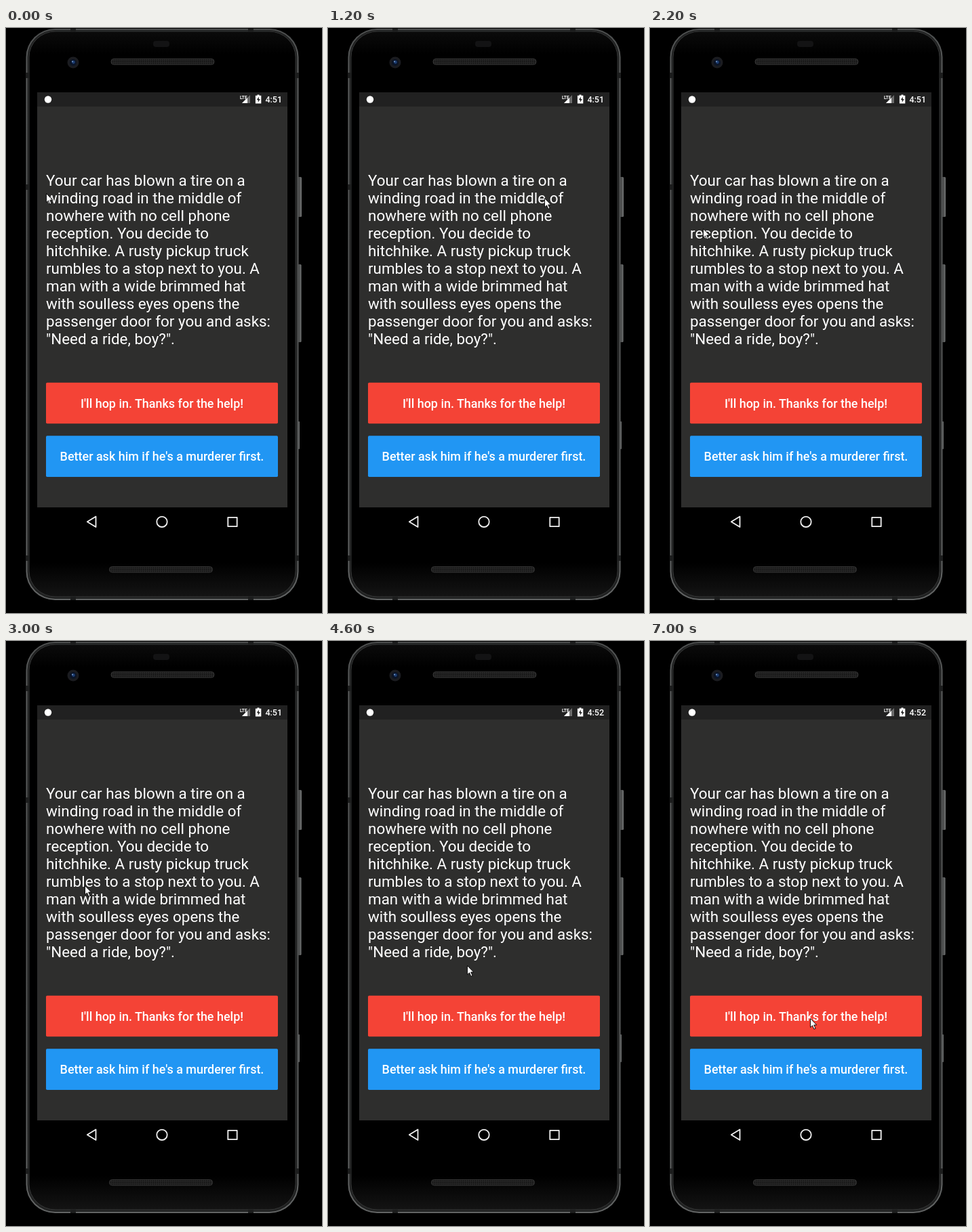
An HTML page for the animation above (8000 ms loop, 466 by 864 pixels).

```html
<!DOCTYPE html>
<html lang="en">
<head>
<meta charset="utf-8">
<title>Story choice</title>
<style>
  html, body { margin: 0; width: 100%; height: 100%; overflow: hidden; background: #000; }
  svg { display: block; width: 466px; height: 864px; }
  text { font-family: Roboto, sans-serif; fill: #fff; }
  .story { font-size: 22.43px; }
  .choice { font-size: 17.95px; font-weight: 500; text-anchor: middle; }
  .clock { font-size: 12.56px; font-weight: 500; }
  .nav { fill: none; stroke: #f2f2f2; stroke-width: 1.8; stroke-linejoin: round; }
</style>
</head>
<body>
<svg viewBox="0 0 466 864">
  <defs>
    <linearGradient id="rim" x2="0" y2="1">
      <stop offset="0" stop-color="#4c4e4e"/>
      <stop offset=".08" stop-color="#5c5e5e"/>
      <stop offset=".5" stop-color="#525454"/>
      <stop offset="1" stop-color="#626464"/>
    </linearGradient>
    <linearGradient id="key">
      <stop offset="0" stop-color="#2b2c2c"/>
      <stop offset="1" stop-color="#757777"/>
    </linearGradient>
    <linearGradient id="glass" x2="0" y2="1">
      <stop offset="0" stop-color="#0b0b0b"/>
      <stop offset=".04" stop-color="#000"/>
      <stop offset=".94" stop-color="#000"/>
      <stop offset="1" stop-color="#141414"/>
    </linearGradient>
    <pattern id="mesh" width="3" height="3" patternUnits="userSpaceOnUse">
      <rect width="3" height="3" fill="#262626"/>
      <circle cx="1.5" cy="1.5" r=".9" fill="#101010"/>
    </pattern>
  </defs>
  <rect width="466" height="864"/>

  <!-- Phone body -->
  <g fill="url(#key)">
    <rect x="430" y="220" width="6" height="59" rx="1.5"/>
    <rect x="430" y="349" width="5.5" height="115" rx="1.5"/>
    <rect x="430" y="581" width="3" height="41" rx="1"/>
  </g>
  <rect x="29.5" y="1" width="402" height="844" rx="43" ry="42" fill="url(#rim)"/>
  <rect x="31.5" y="3" width="398" height="840" rx="41" ry="40" fill="#202121"/>
  <rect x="34" y="5" width="393" height="835" rx="39" ry="38" fill="url(#glass)" stroke="#353636"/>
  <path d="M29 70h6M426 70h6M29 235h6M29 783h6M426 783h6M99 1v4M361 1v4M99 840v5M361 840v5"
        stroke="#1c1d1d" stroke-width="8"/>
  <rect x="217" y="19" width="24" height="9" rx="4" fill="#131314"/>
  <circle cx="99" cy="51" r="8.5" fill="#1b1c20"/>
  <circle cx="99" cy="51" r="5" fill="#0b1426"/>
  <circle cx="99.5" cy="50.5" r="2.4" fill="#1c3c70"/>
  <circle cx="98" cy="49.5" r="1" fill="#7da0cf"/>
  <g fill="url(#mesh)" stroke="#343434">
    <rect x="155" y="45.5" width="152" height="8.5" rx="4"/>
    <rect x="152.5" y="795.5" width="152" height="8.5" rx="4"/>
  </g>

  <!-- Screen -->
  <rect x="46" y="95" width="369" height="613" fill="#2e2e2d"/>
  <rect x="46" y="95" width="369" height="21" fill="#212121"/>
  <circle cx="62" cy="105.5" r="5.2" fill="#fff"/>
  <text x="345" y="104.5" font-size="6.5" font-weight="700">LTE</text>
  <path d="M360 99v12h-12z" fill="#6c6c6c"/>
  <path d="M356 103v8h-8z" fill="#fff"/>
  <path d="M370.5 98.5h3v1.3h2.8v11.7h-8.4v-11.7h2.6z" fill="#fff"/>
  <path d="M372.8 101.5l-3 4.7h2v3.6l3-4.7h-2z" fill="#212121"/>
  <text id="clock" class="clock" x="382.4" y="110"></text>

  <g id="story" class="story"></g>

  <rect x="59" y="523.7" width="342" height="60.5" rx="1.8" fill="#f44336"/>
  <text class="choice" x="230" y="560.5">I'll hop in. Thanks for the help!</text>
  <rect x="59" y="602.2" width="342" height="60.8" rx="1.8" fill="#2196f3"/>
  <text class="choice" x="230" y="639.3">Better ask him if he's a murderer first.</text>

  <g class="nav">
    <path d="M119.8 729.3l12.7-7.8v15.6z"/>
    <circle cx="230" cy="729.3" r="7.7"/>
    <rect x="327.3" y="722.8" width="13.4" height="13.4"/>
  </g>

  <path id="cursor" d="M.5 .5v13.2l3-2.8 2.4 5.4 2.2-1-2.4-5.2h4z"
        fill="#fff" stroke="#000" stroke-width=".9"/>
</svg>
<script>
  const LOOP = 8000, TICK = 200, CLOCK_CHANGE = 3400;
  const lines = [
    'Your car has blown a tire on a',
    'winding road in the middle of',
    'nowhere with no cell phone',
    'reception. You decide to',
    'hitchhike. A rusty pickup truck',
    'rumbles to a stop next to you. A',
    'man with a wide brimmed hat',
    'with soulless eyes opens the',
    'passenger door for you and asks:',
    '"Need a ride, boy?".'
  ];
  // Pointer waypoints: time, x, y
  const path = [
    [0, 59, 244], [200, 43, 229], [400, 84, 237], [600, 143, 246],
    [1000, 268, 250], [1200, 319, 251], [1600, 212, 272], [2000, 105, 289],
    [2200, 78, 296], [2400, 75, 297], [2800, 93, 341], [3000, 116, 361],
    [3600, 172, 368], [4600, 205, 479], [4800, 209, 499], [5200, 214, 533],
    [5600, 217, 548], [6999, 217, 548], [7000, 236, 557], [LOOP, 236, 557]
  ];
  const story = document.getElementById('story');
  const clock = document.getElementById('clock');
  const cursor = document.getElementById('cursor');

  lines.forEach((line, i) => {
    const row = document.createElementNS(story.namespaceURI, 'text');
    row.setAttribute('x', 59);
    row.setAttribute('y', 233.2 + i * 26);
    row.textContent = line;
    story.append(row);
  });

  function pointerAt(t) {
    const next = path.findIndex(p => p[0] > t);
    const [t0, x0, y0] = path[next - 1], [t1, x1, y1] = path[next];
    const k = (t - t0) / (t1 - t0);
    return [Math.round(x0 + (x1 - x0) * k), Math.round(y0 + (y1 - y0) * k)];
  }

  function draw() {
    const elapsed = performance.now() % LOOP;
    const t = Math.floor(elapsed / TICK) * TICK;
    cursor.setAttribute('transform', `translate(${pointerAt(t)})`);
    clock.textContent = t < CLOCK_CHANGE ? '4:51' : '4:52';
    requestAnimationFrame(draw);
  }
  draw();
</script>
</body>
</html>
```
